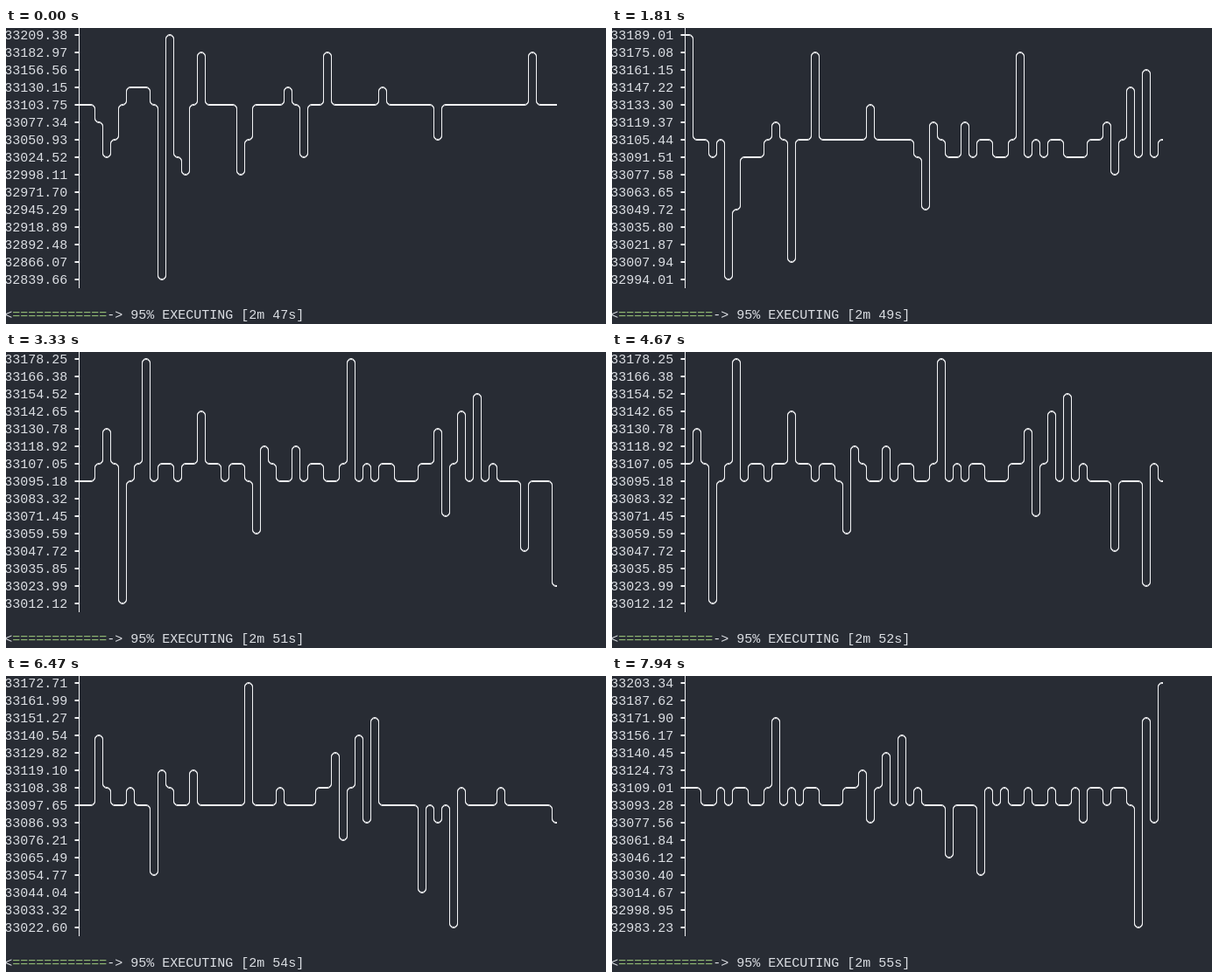
Write an HTML page that moves like this. It is 685 by 339 pixels and loops after 8000 ms.

```html
<!DOCTYPE html>
<html lang="en">
<head>
<meta charset="utf-8">
<title>Live terminal chart</title>
<style>
  html, body { margin: 0; width: 100%; height: 100%; overflow: hidden; background: #282c34; }
  svg { display: block; width: 685px; height: 339px; }
  text { font: 15px "Source Code Pro", "Liberation Mono", monospace; fill: #dcdfe4; white-space: pre; }
  .bar { fill: #98c379; }
  path { fill: none; stroke: #f2f3f5; stroke-width: 1; }
</style>
</head>
<body>
<svg viewBox="0 0 685 339">
  <g id="labels"></g>
  <!-- Drawn twice, one pixel apart: horizontals are 2px, verticals 1px -->
  <g id="plot"><path id="axis"/><path id="line"/></g>
  <use href="#plot" y="1"/>
  <text x="-1.8" y="333">&lt;<tspan class="bar">============</tspan>-&gt; 95% EXECUTING [2m <tspan id="secs">47</tspan>s]</text>
</svg>
<script>
const LOOP = 8000, BASE = 33000, ROWS = 14, COLS = 60;
const CELL = 9, ROW_H = 20, TOP = 7.5, AXIS = 83.5, R = CELL / 2;

// Large moves: sample index and the prices that follow, as offsets from BASE
const moves = {
  2: [77, 25, 51], 6: [130, 130, 130], 10: [-160.34, 209.38, 25, -2], 15: [189.01],
  18: [95], 20: [-5.99, 48, 95, 95, 95], 26: [125.5], 28: [12.12], 31: [178.25],
  34: [108], 38: [140, 108], 42: [108], 44: [97, 55, 115, 108], 50: [115, 97, 102],
  57: [172.71], 61: [108], 66: [104, 104, 125.5, 75, 108, 143, 91, 155.5], 75: [102],
  79: [45], 81: [91], 83: [22.6, 108], 89: [108], 96: [83.5, 102, 108], 100: [108],
  103: [-16.77, 177, 78, 203.34]
};

// Between moves the price flickers on every third sample
function quietPrice(i) {
  const third = i % 3 === 2;
  if (i < 47) return third ? 100 : 103;
  const calm = i > 64 && i < 84;
  return third && !calm ? 102.5 : 97.5;
}

const prices = Array.from({ length: 107 }, (_, i) => quietPrice(i));
for (const [at, run] of Object.entries(moves)) prices.splice(+at, run.length, ...run);

// Pace of the feed: [time in ms, samples received]
const pace = [
  [0, 0], [270, 3], [800, 5], [1400, 9], [1810, 15], [2670, 20], [2930, 21],
  [3330, 23], [4340, 24], [4670, 25], [5340, 30], [5740, 31], [6540, 37],
  [6870, 38], [7270, 42], [7470, 43], [7540, 44], [7940, 46], [LOOP, 46]
];

function received(t) {
  const i = pace.findIndex(([end]) => t < end);
  const [t0, n0] = pace[i - 1], [t1, n1] = pace[i];
  return Math.floor(n0 + (n1 - n0) * (t - t0) / (t1 - t0) + 1e-6);
}

const byId = id => document.getElementById(id);
const rowY = r => TOP + r * ROW_H;

const labels = [];
let axis = `M${AXIS} -1V297`;
for (let r = 0; r <= ROWS; r++) {
  const label = document.createElementNS("http://www.w3.org/2000/svg", "text");
  label.setAttribute("x", -1.8);
  label.setAttribute("y", 13 + r * ROW_H);
  labels.push(byId("labels").appendChild(label));
  axis += `M78.5 ${rowY(r)}H${AXIS}`;
}
byId("axis").setAttribute("d", axis);

function tracePath(ys) {
  let d = `M${AXIS} ${ys[0]}`;
  for (let i = 1; i < ys.length; i++) {
    const from = ys[i - 1], to = ys[i];
    if (from === to) continue;
    const x = AXIS + i * CELL, dir = Math.sign(to - from), down = dir > 0 ? 1 : 0;
    d += `H${x - R}A${R} ${R} 0 0 ${down} ${x} ${from + dir * R}`
       + `V${to - dir * R}A${R} ${R} 0 0 ${1 - down} ${x + R} ${to}`;
  }
  return d + `H${AXIS + COLS * CELL + 5.5}`;
}

function drawChart(shift) {
  const view = prices.slice(shift, shift + COLS + 1);
  const max = Math.max(...view), min = Math.min(...view);
  const step = (max - min) / ROWS;
  labels.forEach((el, r) => { el.textContent = (BASE + max - r * step).toFixed(2); });
  const ys = view.map(v => rowY(ROWS - Math.round((v - min) / step)));
  byId("line").setAttribute("d", tracePath(ys));
}

let shown = -1;
function render(now) {
  const t = now % LOOP;
  const shift = received(t);
  if (shift !== shown) drawChart(shown = shift);
  byId("secs").textContent = 47 + Math.floor((t + 860) / 1000);
}

function frame() {
  render(performance.now());
  requestAnimationFrame(frame);
}
frame();
</script>
</body>
</html>
```
